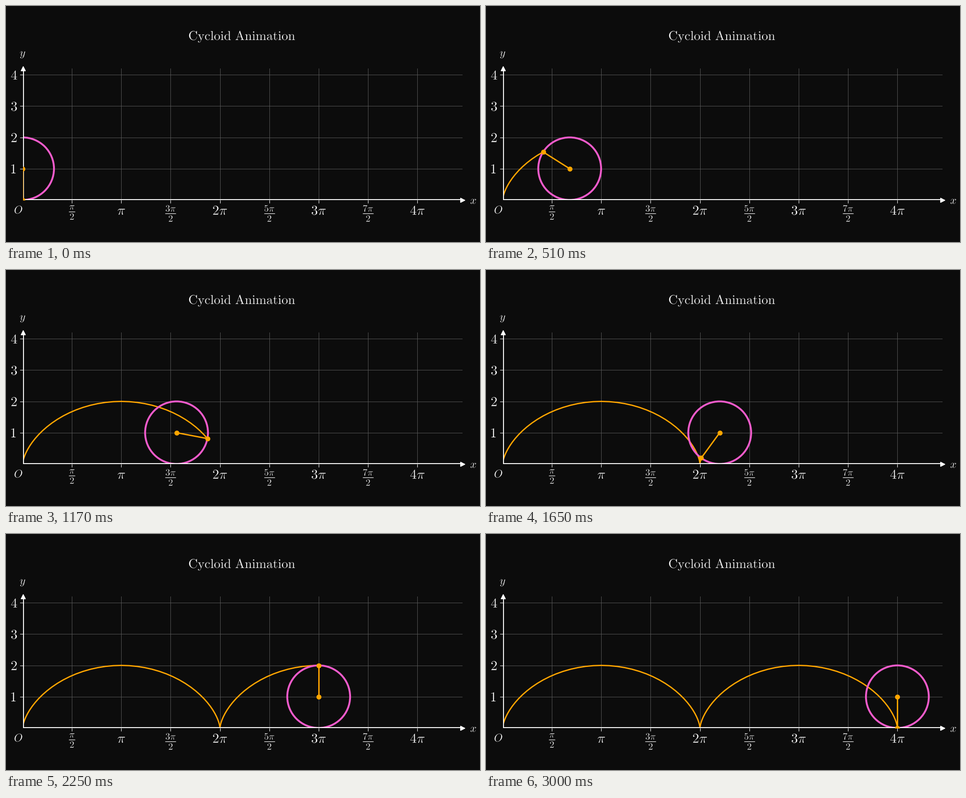
A matplotlib script that plays this animation: 1058x529 px, repeating every 3030 ms.

```python
import numpy as np
import matplotlib.pyplot as plt
from matplotlib.animation import FuncAnimation
from matplotlib.patches import Circle, PathPatch
from matplotlib.textpath import TextPath
from matplotlib.transforms import Affine2D

plt.rcParams["mathtext.fontset"] = "cm"

W, H, DPI = 1058, 529, 100
X0, Y0, UNIT = 36.97, 434.83, 70.13    # data origin (from top left) and scale, in pixels
LEFT = 38                              # the plot is cut off just right of x = 0
X_MIN, X_MAX, Y_MAX = (LEFT - X0) / UNIT, 14, 4.2
FRAMES = 101
BG, FG, GRID = "#0c0c0c", "white", "#5a5a5a"
PINK, ORANGE = "#f15bcb", "orange"
BIG, MID, SMALL = 30.6, 25, 21.4       # type sizes in pixels

fig = plt.figure(figsize=(W / DPI, H / DPI), dpi=DPI, facecolor=BG)


def add_axes(rect, xlim, ylim):
    ax = fig.add_axes(rect)
    ax.set_axis_off()
    ax.set_xlim(*xlim)
    ax.set_ylim(*ylim)
    return ax


page = add_axes([0, 0, 1, 1], (0, W), (0, H))
plot = add_axes([LEFT / W, 1 - Y0 / H, (X_MAX - X_MIN) * UNIT / W, Y_MAX * UNIT / H],
                (X_MIN, X_MAX), (0, Y_MAX))


def label(text, cx, base, size):
    """Centre text on cx with its baseline at base; return its ink width."""
    path = TextPath((0, 0), text, size=size)
    box = path.get_extents()
    shift = Affine2D().translate(cx - (box.x0 + box.x1) / 2, H - base)
    # the background-coloured outline gives lighter strokes
    page.add_patch(PathPatch(path, fc=FG, ec=BG, lw=0.2,
                             transform=shift + page.transData))
    return box.width


def segment(xs, ys, width):
    page.plot(xs, [H - y for y in ys], color=FG, lw=width, solid_capstyle="butt")


def fraction(num, cx, bar):
    width = label(num, cx, bar - 4.6, SMALL) + 2
    label("$2$", cx, bar + 18.2, SMALL)
    segment([cx - width / 2, cx + width / 2], [bar, bar], 0.9)


# Labels and ticks
label(r"$\mathrm{Cycloid\ Animation}$", 526.8, 76.3, 29)
label("$x$", 1043, 443.5, MID)
label("$y$", 37, 112.7, MID)
label("$O$", 27.6, 465.2, MID)

for n in range(1, 5):
    y = Y0 - n * UNIT
    plot.axhline(n, color=GRID, lw=0.7, zorder=0.5)
    segment([LEFT - 7, LEFT], [y, y], 0.8)
    label(f"${n}$", 16.7 if n == 1 else 18, y + 10.6, BIG)

for k in range(1, 9):
    x = X0 + k * np.pi / 2 * UNIT
    plot.axvline(k * np.pi / 2, color=GRID, lw=0.7, zorder=0.5)
    segment([x, x], [Y0, Y0 + 7], 0.8)
    if k % 2:
        num = r"$\pi$" if k == 1 else rf"${k}\pi$"
        fraction(num, x, 460.9 if k == 1 else 465.3)
    else:
        num = r"$\pi$" if k == 2 else rf"${k // 2}\pi$"
        label(num, x, 468, BIG)

# Axis lines, half hidden by the plot's edge, with arrow heads
plot.axhline(0, color=FG, lw=3)
plot.axvline(X_MIN, color=FG, lw=3)
plot.plot(1, 0, ">", color=FG, ms=7, transform=plot.transAxes, clip_on=False)
plot.plot(0, 1, "^", color=FG, ms=7, transform=plot.transAxes, clip_on=False)

# Moving parts
trace, = plot.plot([], [], color=ORANGE, lw=2.1, zorder=1)
wheel = plot.add_patch(Circle((0, 1), 1, fill=False, ec=PINK, lw=3, zorder=1.5))
spoke, = plot.plot([], [], "o-", color=ORANGE, lw=2.2, ms=7, zorder=3)

angles = np.linspace(0, 4 * np.pi, FRAMES)
curve_x = angles - np.sin(angles)
curve_y = 1 - np.cos(angles)


def draw(i):
    t = angles[i]
    wheel.center = (t, 1)
    trace.set_data(curve_x[:i + 1], curve_y[:i + 1])
    spoke.set_data([t, curve_x[i]], [1, curve_y[i]])
    return wheel, trace, spoke


anim = FuncAnimation(fig, draw, frames=FRAMES, interval=30, repeat=True,
                     init_func=lambda: draw(0), blit=False)
plt.show()
```
